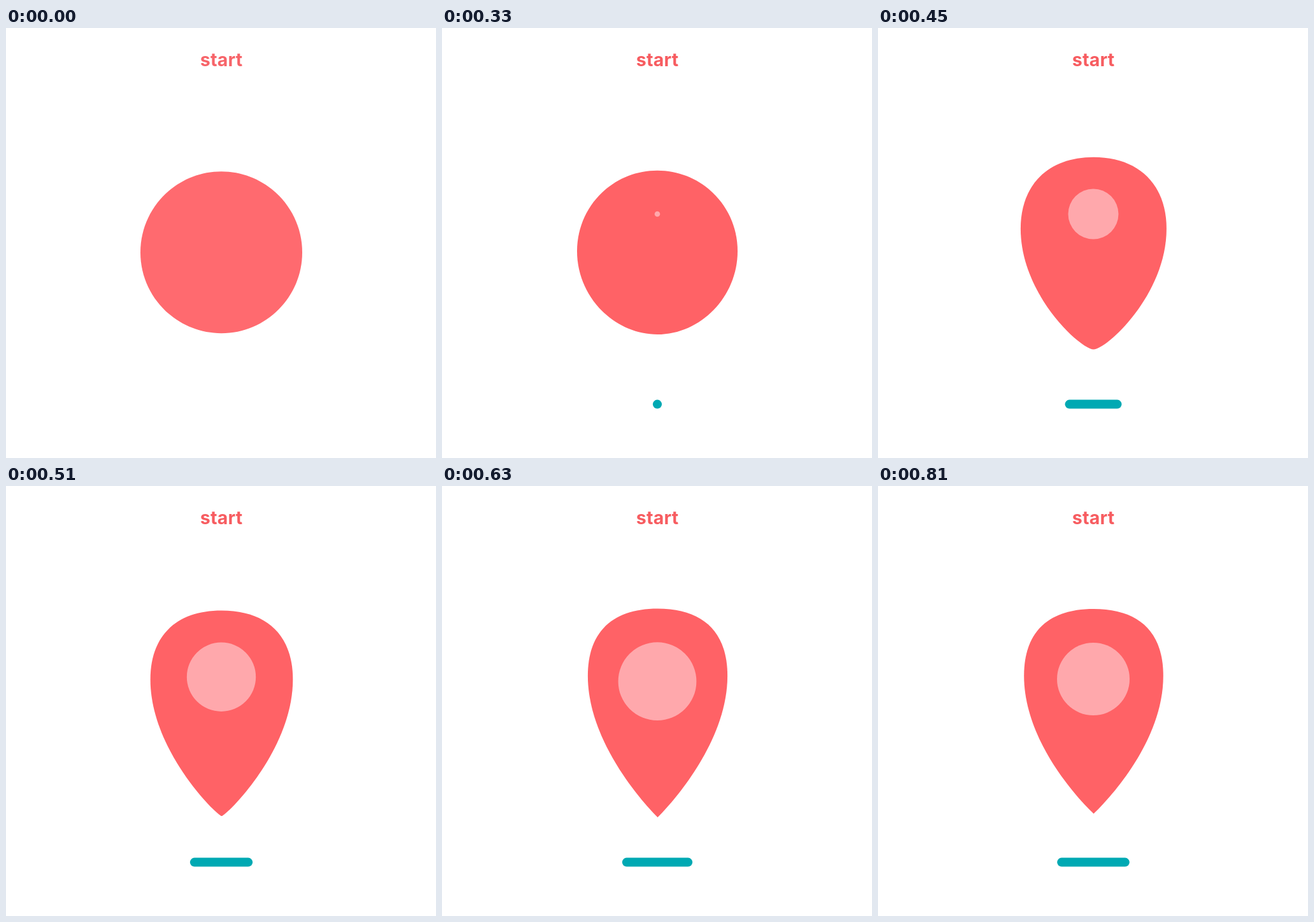
These frames come from a looping animation (675x675 px, 1.29 s). An HTML page:

```html
<!DOCTYPE html>
<html lang="en">
<head>
<meta charset="utf-8">
<title>start</title>
<style>
  html, body { margin: 0; width: 100%; height: 100%; overflow: hidden; background: #fff; }
  svg { display: block; width: 100vw; height: 100vh; }
  text { font: 700 28.5px Inter, "Open Sans", sans-serif; letter-spacing: .2px; text-anchor: middle; }
  #hole { fill: #ffa8ac; }
  #bar { stroke: #00a9b3; stroke-width: 14; stroke-linecap: round; }
</style>
</head>
<body>
<svg viewBox="0 0 675 675">
  <text id="label" x="338.1" y="60.3">start</text>
  <path id="pin"/>
  <circle id="hole" cx="338"/>
  <path id="bar"/>
</svg>
<script>
const LOOP = 1290, STEP = 30, CX = 338, ARM = 70;
const TIMES = [300, 330, 450, 570, 690, 810];
const $ = id => document.getElementById(id);
const label = $('label'), pin = $('pin'), hole = $('hole'), bar = $('bar');

// Monotone cubic curve through values at TIMES, flat at both ends.
function track(...v) {
  const n = v.length;
  const rate = i => (v[i + 1] - v[i]) / (TIMES[i + 1] - TIMES[i]);
  const slope = v.map((_, i) => {
    if (i === 0 || i === n - 1) return 0;
    const a = rate(i - 1), b = rate(i);
    return a * b > 0 ? 2 * a * b / (a + b) : 0;
  });
  return t => {
    if (t <= TIMES[0]) return v[0];
    if (t >= TIMES[n - 1]) return v[n - 1];
    let i = 0;
    while (t >= TIMES[i + 1]) i++;
    const d = TIMES[i + 1] - TIMES[i], u = (t - TIMES[i]) / d, w = 1 - u;
    return w * w * ((1 + 2 * u) * v[i] + u * d * slope[i])
         + u * u * ((1 + 2 * w) * v[i + 1] - w * d * slope[i + 1]);
  };
}

const axis = track(338, 338, 338.4, 338.5, 338.5, 338.5);
const crown = track(225.2, 223.8, 202.8, 192, 193, 193);
const half = track(127, 126, 114.5, 110.3, 109.3, 109.3);
const waist = track(352.2, 350.2, 315, 298, 298, 298);
const tip = track(479.2, 481, 504.5, 526, 514.3, 514.3);
const downArm = track(70, 71.5, 104, 116, 116, 116);
const tipArm = track(70, 68, 20, 0, 0, 0);
const holeR = track(0, 4.3, 39.5, 62, 60.2, 57);
const holeY = track(292, 292, 292, 307.5, 305.2, 303);
const barHalf = track(0, 0.1, 37.5, 45.1, 49.8, 49.8);

function pinPath(t) {
  const x = axis(t), w = half(t), l = x - w, r = x + w;
  const y0 = crown(t), y1 = waist(t), y2 = tip(t);
  const up = y1 - ARM, down = y1 + downArm(t), b = tipArm(t);
  return `M${x} ${y0}C${x + ARM} ${y0} ${r} ${up} ${r} ${y1}` +
    `C${r} ${down} ${x + b} ${y2} ${x} ${y2}` +
    `C${x - b} ${y2} ${l} ${down} ${l} ${y1}` +
    `C${l} ${up} ${x - ARM} ${y0} ${x} ${y0}Z`;
}

function paint(el, r, g, b, fade) {
  el.setAttribute('fill', `rgb(${r} ${Math.round(g + 8 * fade)} ${Math.round(b + 9 * fade)})`);
}

function draw(now) {
  const t = Math.floor((now % LOOP) / STEP) * STEP;
  const fade = 1 - Math.min(t / 120, 1);
  paint(label, 247, 92, 96, fade);
  paint(pin, 255, 98, 102, fade);
  pin.setAttribute('d', pinPath(t));
  hole.setAttribute('r', holeR(t));
  hole.setAttribute('cy', holeY(t));
  const h = barHalf(t);
  bar.setAttribute('d', t < 330 ? '' : `M${CX - h} 590.6H${CX + h}`);
}

let start;
function tick(now) {
  start ??= now;
  draw(now - start);
  requestAnimationFrame(tick);
}
draw(0);
requestAnimationFrame(tick);
</script>
</body>
</html>
```
